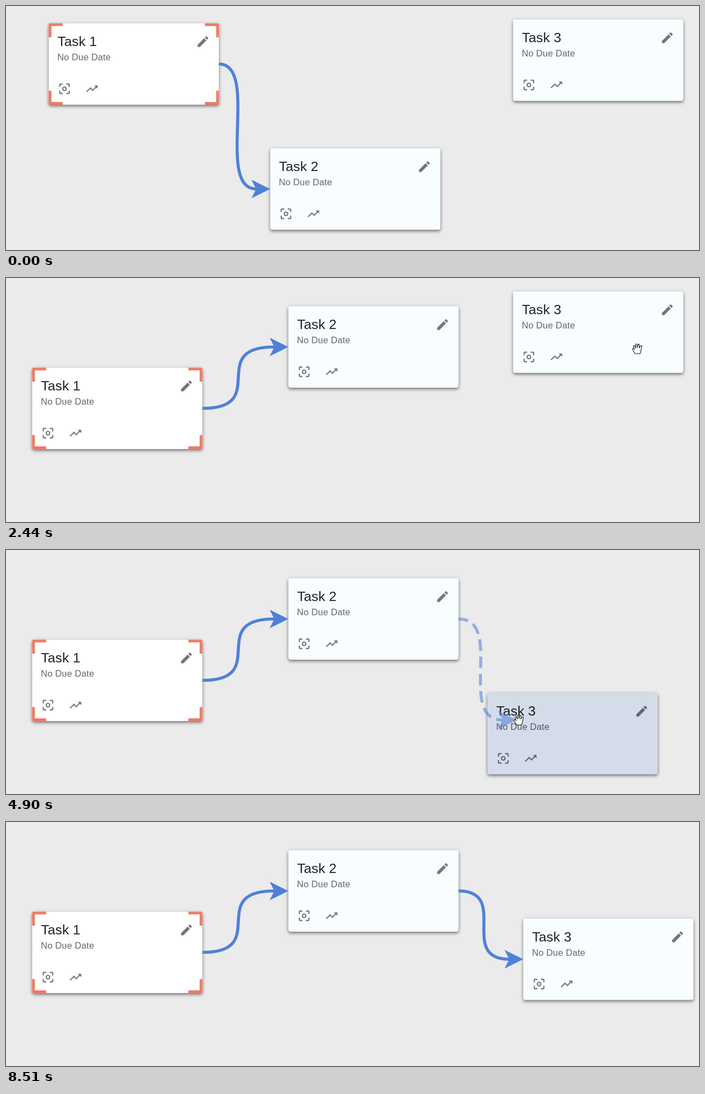
An HTML page that plays this animation: 1258 by 445 pixels, repeating every 8.91 s.

```html
<!DOCTYPE html>
<html lang="en">
<head>
<meta charset="utf-8">
<title>Task board</title>
<style>
  html, body { margin: 0; width: 100%; height: 100%; overflow: hidden; background: #ebebeb; }
  svg { display: block; width: 100%; height: 100%; }
  text { font-family: "Liberation Sans", Arial, sans-serif; white-space: pre; }
  .title { font-size: 24.72px; fill: #000; fill-opacity: .87; }
  .due { font-size: 16.48px; letter-spacing: .155px; fill: #000; fill-opacity: .6; }
  .icon { fill: #000; fill-opacity: .54; }
  .panel { filter: drop-shadow(0 1px 3px rgba(0,0,0,.2)) drop-shadow(0 3px 2.5px rgba(0,0,0,.36)); }
  .corners { fill: none; stroke: #ee7c66; stroke-width: 5; stroke-linejoin: round; }
  .link path { fill: none; stroke: #4f81d9; stroke-width: 5.5; }
  .link .head { fill: #4f81d9; stroke: none; }
  .dashed { opacity: .56; }
  .dashed path:first-child { stroke-dasharray: 21 10.4; stroke-dashoffset: 3.5; }
  .press { fill: #fdee3a; fill-opacity: .64; }
  .pointer path { fill: #fff; stroke: #161616; stroke-width: 1.1; stroke-linejoin: round; }
</style>
</head>
<body>
<svg id="stage" viewBox="0 0 1258 445"></svg>
<script>
const LOOP = 8910, STEP = 67, HOLD = 390;
const W = 309, H = 148.5, MID = 74.2, HEAD = 34;
const stage = document.getElementById('stage');

const ICONS = {
  edit: 'M3 17.25V21h3.75L17.81 9.94l-3.75-3.75L3 17.25zM20.71 7.04c.39-.39.39-1.02 0-1.41l-2.34-2.34c-.39-.39-1.02-.39-1.41 0l-1.83 1.83 3.75 3.75 1.83-1.83z',
  focus: 'M5 15H3v4c0 1.1.9 2 2 2h4v-2H5v-4zM5 5h4V3H5c-1.1 0-2 .9-2 2v4h2V5zM19 3h-4v2h4v4h2V5c0-1.1-.9-2-2-2zM19 19h-4v2h4c1.1 0 2-.9 2-2v-4h-2v4zM12 8a4 4 0 1 0 0 8 4 4 0 1 0 0-8zM12 14a2 2 0 1 1 0-4 2 2 0 1 1 0 4z',
  trend: 'M16 6l2.29 2.29-4.88 4.88-4-4L2 16.59 3.41 18l6-6 4 4 6.3-6.29L22 12V6z'
};
const HAND = 'M-4.5 9C-5 6-9 2-9 .5C-8.5-1.5-6-1-5 1.5L-7-4.5C-7-6.5-5-6.5-4.2-5L-2.6-1.5L-3-7.5C-2.8-9.5-.6-9.5-.2-7.5L.3-2L1.5-7.5C2-9 4-8.5 4-6.8L3.5-1.5L6-5C7-6.3 8.8-5.3 8.2-3.5C7 0 7 4 5 9Z';
const ARROW = 'M0 0V16L3.7 12.6L6.3 18.5L9 17.3L6.4 11.5H11.5Z';

function add(parent, tag, attrs = {}, text) {
  const el = document.createElementNS('http://www.w3.org/2000/svg', tag);
  for (const k in attrs) el.setAttribute(k, attrs[k]);
  if (text) el.textContent = text;
  return parent.appendChild(el);
}

function icon(parent, name, x, y, scale) {
  add(parent, 'path', { class: 'icon', d: ICONS[name],
    transform: `translate(${x} ${y}) scale(${scale}) translate(-12 -12)` });
}

function makeCard(n, x, y) {
  const g = add(stage, 'g');
  const panel = add(g, 'rect', { class: 'panel', width: W, height: H, rx: 4,
    fill: n === 1 ? '#fff' : '#f8feff' });
  if (n === 1) {
    const r = W - 2.5, b = H - 2.5;
    add(g, 'path', { class: 'corners',
      d: `M2.5 25.5V2.5H25.5M${r - 23} 2.5H${r}V25.5M${r} ${b - 23}V${b}H${r - 23}M25.5 ${b}H2.5V${b - 23}` });
  }
  add(g, 'text', { class: 'title', x: 16, y: 41.5 }, 'Task ' + n);
  add(g, 'text', { class: 'due', x: 15.7, y: 67.5 }, 'No Due Date');
  icon(g, 'edit', 280, 33.5, 1.08);
  icon(g, 'focus', 28.7, 119.5, 1.08);
  icon(g, 'trend', 78.5, 119.5, 1.05);
  return { g, panel, home: { x, y } };
}

function makeLink(extra = '') {
  const g = add(stage, 'g', { class: 'link ' + extra });
  return { g, line: add(g, 'path'), head: add(g, 'path', { class: 'head' }) };
}

function drawLink(link, from, tip) {
  const x = from.x + W, y = from.y + MID;
  const end = tip.x - HEAD * .75, bend = Math.abs(tip.x - x) * .8;
  link.line.setAttribute('d', `M${x} ${y}C${x + bend} ${y} ${end - bend} ${tip.y} ${end} ${tip.y}`);
  link.head.setAttribute('d',
    `M${tip.x - HEAD} ${tip.y - HEAD / 2}L${tip.x} ${tip.y}L${tip.x - HEAD} ${tip.y + HEAD / 2}L${end} ${tip.y}Z`);
}

const cards = [makeCard(1, 77.5, 31.5), makeCard(2, 479.5, 259.5), makeCard(3, 920.5, 24.5)];
const firstLink = makeLink(), secondLink = makeLink(), draft = makeLink('dashed');
const pointer = add(stage, 'g', { class: 'pointer' });
const shape = add(pointer, 'path');
const press = add(stage, 'circle', { class: 'press', r: 12 });

// The pointer's journey; a drag takes a card along
const hops = [];
const glide = (from, to, x, y, card) => hops.push({ from, to, x, y, card });
const drag = (card, ...hop) => glide(...hop, card);

glide(330, 660, 222, 152);
drag(0, 740, 1280, 206.5, 257.5);
drag(0, 1280, 1470, 192, 284);
glide(1480, 1690, 692, 385);
drag(1, 1700, 2170, 725, 177);
glide(2170, 2440, 1146, 129);
drag(2, 2580, 3120, 1099.5, 365);
glide(3200, 3620, 420, 197);
glide(3620, 3960, 591, 171);
glide(4170, 4890, 931, 310);
glide(5090, 5240, 951, 335);
glide(6250, 6450, 983.5, 334);
drag(2, 6590, 6650, 985, 334);
drag(2, 6650, 7000, 1048.5, 249.5);
glide(7470, 7960, 446, 62);
glide(8160, 8510, 1177, 450);

const smooth = p => p * p * (3 - 2 * p);
const show = (el, on) => el.setAttribute('visibility', on ? 'visible' : 'hidden');
const inside = (p, c) => p.x > c.x && p.x < c.x + W && p.y > c.y && p.y < c.y + H;

function progress(hop, t) {
  if (t >= hop.to) return 1;
  const passed = Math.floor((t - hop.from) / STEP) * STEP;
  return smooth(passed / (hop.to - hop.from));
}

function poseAt(t) {
  const cur = { x: 965, y: 421 }, pos = cards.map(c => ({ ...c.home }));
  let pressed = false;
  for (const hop of hops) {
    if (t < hop.from) break;
    const p = progress(hop, t), dx = (hop.x - cur.x) * p, dy = (hop.y - cur.y) * p;
    const moved = hop.card === undefined ? [cur] : [cur, pos[hop.card]];
    for (const m of moved) { m.x += dx; m.y += dy; }
    pressed = moved.length > 1 && t < hop.to + HOLD;
  }
  return { cur, pos, pressed };
}

function render(t) {
  const { cur, pos, pressed } = poseAt(t);
  const linking = t >= 4230 && t < 5500;
  const port = c => ({ x: c.x, y: c.y + MID });

  cards.forEach((c, i) => c.g.setAttribute('transform', `translate(${pos[i].x} ${pos[i].y})`));
  cards[2].panel.setAttribute('fill', linking && inside(cur, pos[2]) ? '#d4dcea' : '#f8feff');

  drawLink(firstLink, pos[0], port(pos[1]));
  drawLink(secondLink, pos[1], port(pos[2]));
  drawLink(draft, pos[1], { x: cur.x - 4, y: cur.y });
  show(secondLink.g, t >= 5760);
  show(draft.g, linking);

  shape.setAttribute('d', pos.some(c => inside(cur, c)) ? HAND : ARROW);
  pointer.setAttribute('transform', `translate(${cur.x} ${cur.y})`);
  show(pointer, t >= 390 && t < 8510);
  press.setAttribute('cx', cur.x + .5);
  press.setAttribute('cy', cur.y + 2);
  show(press, pressed);
}

const start = performance.now();
function tick() {
  render((performance.now() - start) % LOOP);
  requestAnimationFrame(tick);
}
tick();
</script>
</body>
</html>
```
